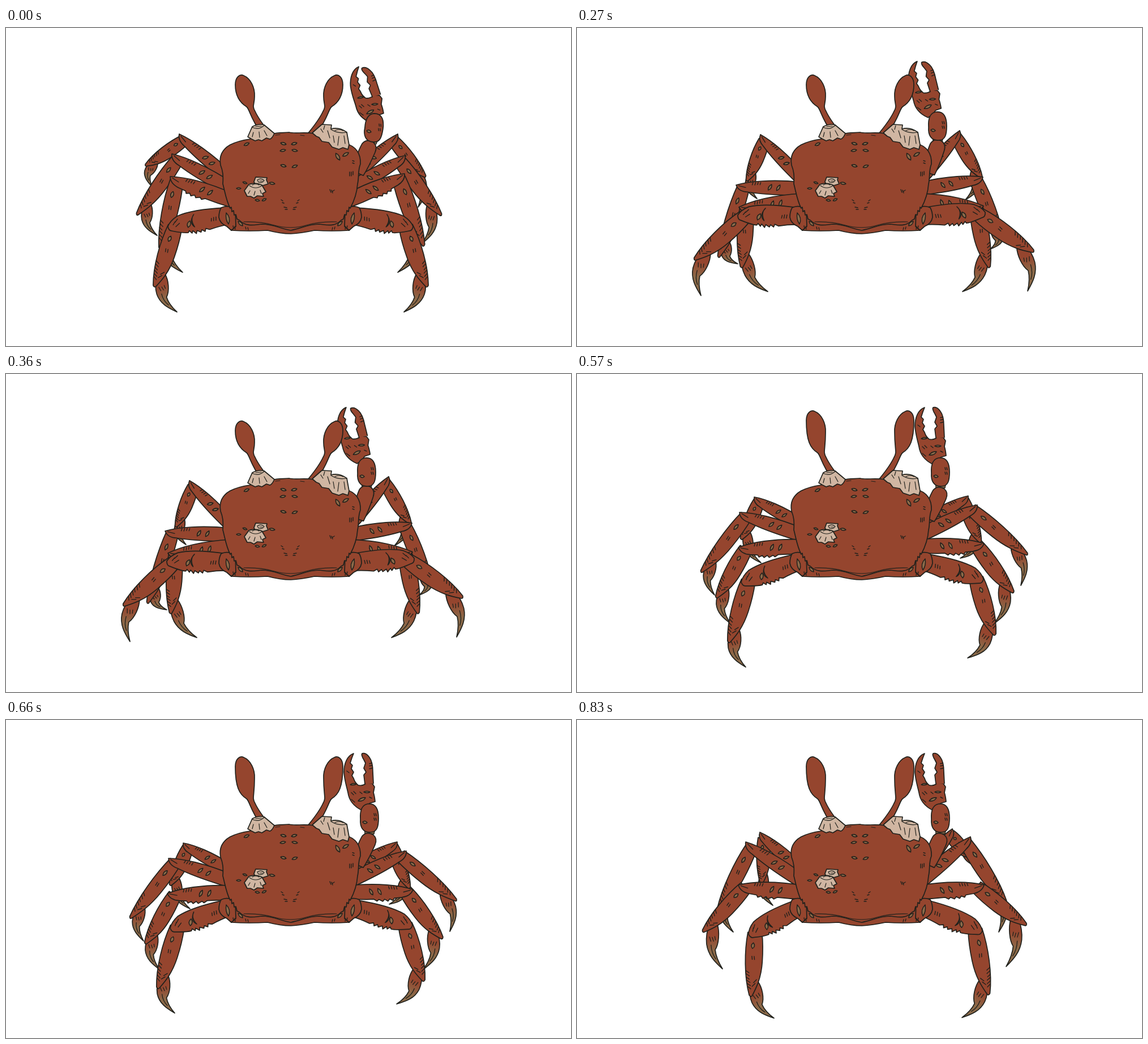
These frames come from a looping animation (998 px wide and 561 px high, 0.9 s). An HTML page with a canvas:

```html
<!DOCTYPE html>
<html lang="en">
<head>
<meta charset="utf-8">
<title>Walking crab</title>
<style>
html, body { margin: 0; width: 100%; height: 100%; overflow: hidden; background: #fff; }
canvas { display: block; width: 100vw; height: 100vh; }
</style>
</head>
<body>
<canvas id="stage" width="998" height="561"></canvas>
<script>
const ctx = document.getElementById('stage').getContext('2d');
const RED = '#95452e', INK = '#20211c', HORN = '#8c6a49', SHELL = '#d0b6a2';
const STEP_ENDS = [120, 270, 420, 570, 720, 900];

// Limb pieces run along x from 0 to 100; positive y faces the inner, lower side.
const THIGH = {
  plain: 'M0,-13C45,-16 80,-9 100,0C97,9 91,13 82,13C50,18 20,15 0,14Z',
  toothed: 'M0,-13C45,-16 80,-9 100,0C97,9 91,13 82,14L70,15 68,19 63,16 60,20 55,16 52,20 46,16 43,19 38,15Q18,15 0,13Z',
  broad: 'M0,-15C30,-19 60,-21 82,-15Q95,-9 100,0Q100,8 95,9C85,13 75,17 68,17L66,14 62,19 60,15 55,21 53,16 47,20 45,16 40,20 38,15 32,18Q15,15 0,15Z'
};
const SPOTS = {
  plain: 'M32,-5q6,4 5,12q-6,-3 -5,-12zM45,-5q6,4 5,12q-6,-3 -5,-12z',
  broad: 'M54,-13q8,8 2,22q9,-9 -2,-22zM62,-3q8,3 5,11q-7,-3 -5,-11z'
};
const HATCH = {
  plain: 'M62,-8l1,5M66,-8l1,5M70,-7l1,5M74,-7l1,5M96,1l-11,3',
  broad: 'M18,-2l1,6M22,-2l1,6M26,-1l1,5M82,-10l5,5M87,-6l4,5M80,-2l7,5'
};
const SHIN = 'M0,-13C30,-17 70,-14 98,-3Q101,0 99,2C85,9 70,16 45,16Q20,16 0,12Z';
const SHIN_SPOT = 'M16,-2q4,-6 9,-1q-4,6 -9,1z';
const SHIN_HATCH = 'M37,-3l5,1M37,1l5,1M60,-12l3,6M65,-11l3,6M70,-11l3,6M75,-9l3,6M80,-8l3,6M85,-6l3,5M73,8l5,-5M79,6l5,-5';
const TALON = 'M-4,-8C12,-16 25,-20 40,-21C65,-22 82,-12 100,0C85,-5 72,-8 56,-7C45,2 20,8 0,6Z';
const TALON_HATCH = 'M26,-13l10,1M28,-8l9,1M27,-3l8,0M44,-13Q62,-15 76,-9';

function paint(d, m, fill, stroke = INK, width = 1.7) {
  const path = new Path2D();
  path.addPath(new Path2D(d), m);
  if (fill) { ctx.fillStyle = fill; ctx.fill(path); }
  ctx.lineWidth = width;
  ctx.strokeStyle = stroke;
  ctx.stroke(path);
}
const flat = new DOMMatrix();
const mirror = axis => new DOMMatrix([-1, 0, 0, 1, 2 * axis, 0]);
const turned = (x, y, deg) => new DOMMatrix().translate(x, y).rotate(deg);

// Maps the 0..100 limb axis onto the line a-b.
function along(a, b, side, girth) {
  const dx = b[0] - a[0], dy = b[1] - a[1], k = girth * side / Math.hypot(dx, dy);
  return new DOMMatrix([dx / 100, dy / 100, -dy * k, dx * k, a[0], a[1]]);
}
function pointOn(m, x, y) {
  const p = m.transformPoint({ x, y });
  return [p.x, p.y];
}

// Each pose holds knee, ankle and claw point.
const leg = (base, side, girth, kind, poses) => ({ base, side, girth, kind, poses });
const legs = [
  leg([395, 265], -1, .78, 'plain', [[306,187,246,243,258,280], [331,176,279,243,289,283],
    [324,188,300,270,318,301], [313,211,303,282,320,316], [313,217,290,292,325,333], [323,198,326,290,346,327]]),
  leg([609, 265], 1, .78, 'plain', [[692,187,741,263,728,316], [668,176,718,243,712,288],
    [676,181,715,265,686,303], [686,203,711,268,690,312], [691,215,713,298,677,325], [663,192,697,243,712,278]]),
  leg([395, 283], -1, .86, 'plain', [[293,222,231,330,267,366], [285,250,248,378,287,426],
    [281,277,250,405,284,416], [285,252,238,363,259,390], [287,244,219,350,243,390], [298,215,249,335,276,374]]),
  leg([609, 283], 1, .86, 'plain', [[705,225,769,331,735,380], [717,246,762,362,720,403],
    [717,263,752,375,730,390], [711,238,790,333,777,387], [707,231,796,319,784,373], [695,206,758,322,745,374]]),
  leg([398, 304], -1, .93, 'toothed', [[290,262,272,390,312,431], [285,288,283,390,320,426],
    [286,316,291,423,337,465], [287,320,319,442,357,479], [285,306,246,395,271,440], [285,291,222,374,257,439]]),
  leg([606, 304], 1, .93, 'toothed', [[704,257,738,385,692,431], [720,284,720,390,681,431],
    [718,314,728,423,681,465], [718,316,687,450,645,479], [719,299,771,386,737,440], [719,291,794,362,758,435]]),
  leg([390, 332], -1, 1, 'broad', [[286,350,262,457,302,501], [284,335,229,433,261,483],
    [284,330,207,409,219,472], [287,344,235,443,267,494], [290,367,268,474,298,517], [303,378,307,488,348,526]]),
  leg([614, 332], 1, 1, 'broad', [[719,350,744,457,703,501], [720,333,769,433,738,489],
    [721,325,807,395,796,464], [720,338,774,431,727,483], [718,362,738,461,690,501], [716,372,727,485,680,525]])
];

function drawLeg({ base, side, girth, kind, poses }, step) {
  const [kx, ky, ax, ay, tx, ty] = poses[step];
  const look = kind === 'broad' ? 'broad' : 'plain';
  const thigh = along(base, [kx, ky], side, girth);
  const shin = along(pointOn(thigh, 88, 3), [ax, ay], side, girth);
  const root = pointOn(shin, 78, 5);
  const talon = along(root, [tx, ty], side, girth);

  const shade = ctx.createLinearGradient(...root, tx, ty);
  shade.addColorStop(.25, RED);
  shade.addColorStop(.6, HORN);
  paint(TALON, talon, shade);
  paint(TALON_HATCH, talon, null, INK, 1.3);
  paint(SHIN, shin, RED);
  paint(SHIN_SPOT, shin, HORN, INK, 1.5);
  paint(SHIN_HATCH, shin, null, INK, 1.4);
  paint(THIGH[kind], thigh, RED);
  paint(SPOTS[look], thigh, HORN, INK, 1.5);
  paint(HATCH[look], thigh, null, INK, 1.4);
}

const UPPER_ARM = 'M0,-12C30,-13 60,-15 84,-13Q103,-9 100,4Q95,14 75,14C50,14 20,13 0,11Z';
const FOREARM = 'M-3,-25C12,-27 16,-14 16,0C16,14 14,25 2,25C-12,26 -17,15 -16,2C-17,-12 -14,-23 -3,-25Z';
const HAND = 'M-14,-99C-26,-95 -31,-80 -31,-66C-30,-50 -26,-40 -24,-30C-22,-15 -12,-5 0,1L8,-3 14,-11 24,-14Q23,-24 21,-30L23,-40 19,-46 9,-47Q2,-41 -6,-43Q-12,-48 -14,-55L-17,-60 -14,-66 -18,-72 -16,-78 -20,-82Q-17,-92 -14,-99Z';
const FINGER = 'M-6,1L-8,-15 -4,-20 -8,-27 -5,-36 -8,-42Q-13,-50 -11,-53Q-4,-55 2,-46Q8,-38 8,-20L9,0';

const OPEN = { elbow: [640, 198], fore: [637, 175, -3], hand: [625, 165, -7], finger: 5 };
const LIFTED = { elbow: [640, 198], fore: [637, 173, 0], hand: [620, 157, -3], finger: -11 };
const UPRIGHT = { elbow: [645, 201], fore: [642, 173, 0], hand: [628, 158, 0], finger: 0 };
const LEANING = { elbow: [645, 200], fore: [650, 176, 8], hand: [644, 166, -4], finger: -15 };
const clawPoses = [LEANING, OPEN, LIFTED, LIFTED, UPRIGHT, UPRIGHT];

function drawClaw({ elbow, fore, hand, finger }) {
  const palm = turned(...hand), wrist = turned(...fore);
  const tilt = turned(...pointOn(palm, 12, -46), finger);
  paint('M-9,18L-8,28 8,28 10,18Z', wrist, HORN, INK, 1.3);
  paint(UPPER_ARM, along([621, 256], elbow, 1, 1), RED);
  paint(HAND, palm, RED);
  paint(FINGER, tilt, RED);
  paint('M2,-35l4,-1M2,-31l5,-1M2,-26l5,-1', tilt, null, INK, 1.4);
  paint('M-20,-44q6,-4 11,-1q-6,3 -11,1zM4,-31q5,-3 11,0q-5,3 -11,0zM-6,-15q5,-7 13,-6q-3,7 -13,6z', palm, HORN, INK, 1.5);
  paint('M-18,-30l4,4M-14,-32l4,4M-3,-31l4,3M-26,-68l4,3M-18,-18l6,5M14,-22l4,2', palm, null, INK, 1.4);
  paint(FOREARM, wrist, RED);
  paint('M-12,7q4,-4 8,1q-4,4 -8,-1z', wrist, HORN, INK, 1.5);
  paint('M8,-8l1,4M11,-8l1,4M8,0l1,4M11,0l1,4', wrist, null, INK, 1.4);
}

function drawEyes(rise) {
  const y = n => n - rise;
  const eye = `M450,184C432,160 430,143 425,139C412,131 405,118 405,${y(100)}` +
    `C405,${y(87)} 413,${y(80)} 420,${y(84)}C432,${y(89)} 440,${y(105)} 439,${y(121)}` +
    'C439,135 434,137 440,147Q447,162 466,185';
  paint(eye, flat, RED);
  paint(eye, mirror(500), RED);
}

const FLAP = 'M396,320L391,348 398,357Q430,359 462,357Q485,363 503,363Q522,362 545,357Q575,359 606,357L613,348 608,320Z';
const HIP = 'M380,317Q392,311 405,320L406,350 398,357 390,350Q378,345 376,334Q376,324 380,317Z';
const SHELL_BACK = 'M470,187C480,184 490,185 500,184C510,187 525,183 545,186L600,204C618,208 627,222 626,240' +
  'C621,252 624,262 621,275C620,290 615,305 608,318L606,316 605,324 602,322 601,330 598,329 596,337 592,339' +
  'C580,352 565,347 553,346C533,346 520,354 503,357C485,354 472,346 452,346C440,347 425,352 412,339' +
  'L408,337 406,329 403,330 402,322 399,324 398,316 396,318C389,305 387,290 383,275C384,260 383,252 379,242' +
  'C376,226 382,214 396,206Q410,199 430,196Z';

// Leaf-shaped spots: x, y, half length, angle.
const spots = [[490,204,5,15], [509,204,5,-15], [489,216,5,-10], [510,216,5,10], [490,243,5,15], [510,244,5,-20],
  [425,205,5,-25], [586,227,7,60], [600,223,6,-30], [422,273,4,20], [470,274,5,10], [411,283,4,0], [444,304,4,10], [456,303,4,-25]];

function drawBody() {
  paint(FLAP, flat, RED);
  for (const m of [flat, mirror(502)]) {
    paint(HIP, m, RED);
    paint('M389,326q9,9 4,20q-6,-8 -4,-20zM410,341q8,1 8,8q-7,-1 -8,-8z', m, HORN, INK, 1.5);
    paint('M401,349l1,5M404,350l1,5M423,351l1,4M427,352l1,4', m, null, INK, 1.3);
  }
  paint(SHELL_BACK, flat, RED);
  paint('M420,342Q450,341 474,348Q503,356 530,348Q554,341 584,342M476,189l8,-1M520,189l7,1', flat, null, INK, 1.2);
  for (const [x, y, r, deg] of spots)
    paint(`M${-r},0Q0,${-r * .8} ${r},0Q0,${r * .8} ${-r},0Z`, turned(x, y, deg), HORN, INK, 1.5);
  paint('M486,303l3,2M488,308l3,1M518,303l-3,2M516,308l-3,1M491,316l5,1M493,320l4,0M513,316l-5,1M511,320l-4,0' +
    'M612,234l3,1M612,238l3,1M607,254l0,7M610,254l0,7M613,253l0,6M572,285l2,5M575,286l2,5M577,288l3,-2', flat, null, INK, 1.4);
}

function drawBarnacles() {
  paint('M427,192L435,174Q447,168 456,171L474,186Q470,195 466,196L460,194 452,199 446,197 440,199 434,196Z', flat, SHELL);
  paint('M541,185L558,170 575,171 574,178Q588,174 602,184L606,206 604,214 595,211 588,214 576,210 570,202 558,200 553,193 548,191Z', flat, SHELL);
  paint('M438,271L441,263 461,264 460,268 463,275 450,279 440,276Z', flat, SHELL);
  paint('M421,287L429,276Q440,272 452,277L459,289 453,292 455,297 444,296 438,300 432,297 426,297Z', flat, SHELL);
  paint('M435,175Q445,181 456,172M441,174l10,-1M437,184l-2,8M447,183l1,10M456,181l5,9' +
    'M574,179Q587,187 602,184M581,181q8,-4 14,0M578,190l2,12M588,191l-2,16M597,190l2,14M568,181l4,13M556,178l4,6M563,172l-2,7' +
    'M430,278Q441,286 452,278M435,277q6,-4 12,0M431,287l-3,5M440,288l-2,7M449,286l2,6' +
    'M444,268q7,-4 12,1q-3,5 -10,3zM448,270l5,0', flat, null, INK, 1.2);
}

function draw(step) {
  ctx.clearRect(0, 0, 998, 561);
  ctx.lineJoin = ctx.lineCap = 'round';
  legs.forEach(l => drawLeg(l, step));
  drawClaw(clawPoses[step]);
  drawEyes(step < 3 ? 0 : 18);
  drawBody();
  drawBarnacles();
}

let shown = -1;
function tick(now) {
  const t = now % 900;
  const step = STEP_ENDS.findIndex(end => t < end);
  if (step !== shown) draw(shown = step);
  requestAnimationFrame(tick);
}
tick(0);
</script>
</body>
</html>
```
